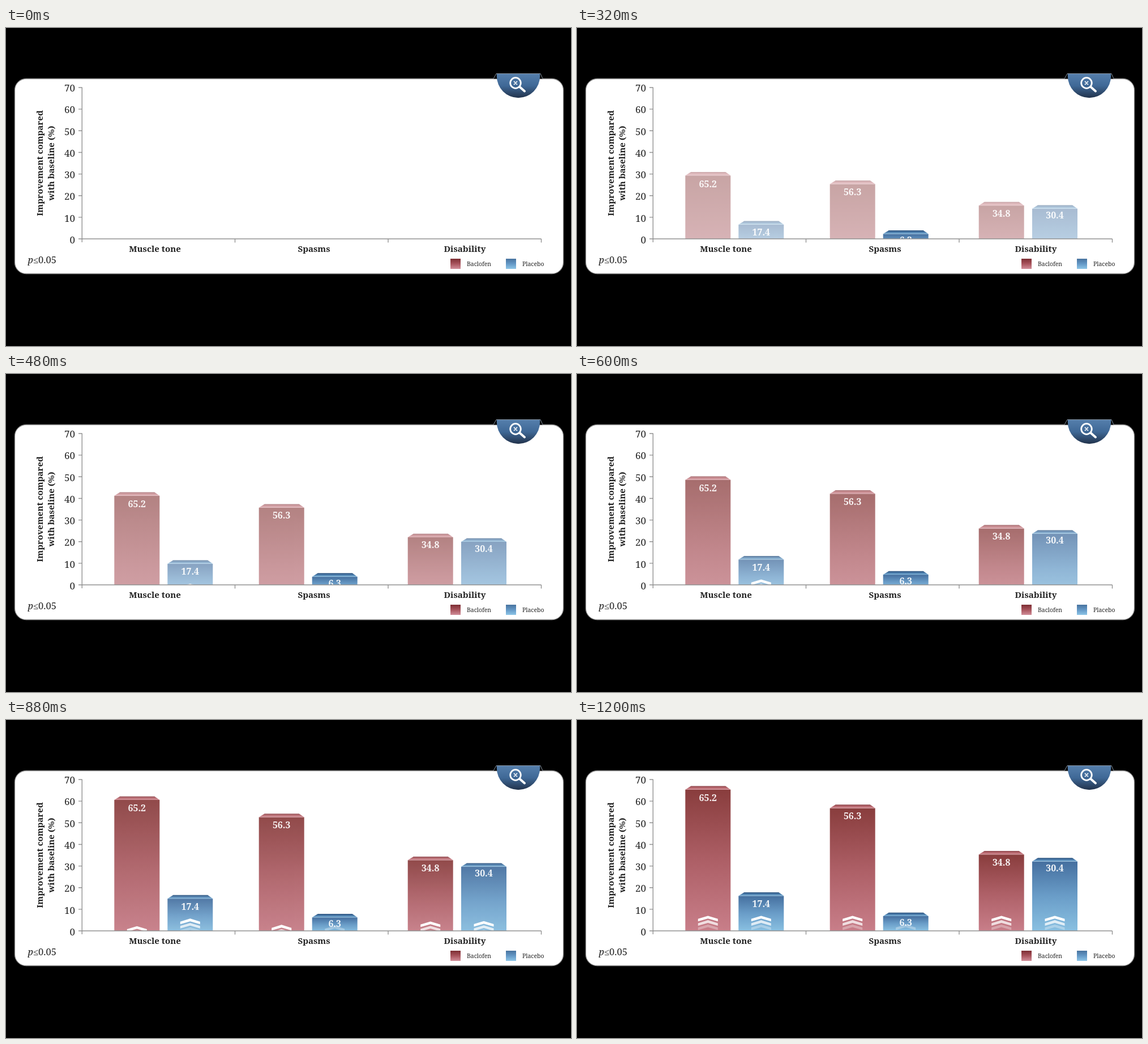
These frames come from a looping animation (998 px wide and 561 px high, 8000 ms). An HTML page:

```html
<!DOCTYPE html>
<html lang="en">
<head>
<meta charset="utf-8">
<title>Improvement compared with baseline</title>
<style>
  html, body { margin: 0; width: 100%; height: 100%; overflow: hidden; background: #000; }
  svg { display: block; font-family: "Noto Serif", serif; fill: #222; }
  .axis { stroke: #929292; stroke-width: 1.4; fill: none; }
  .tick { font-size: 17px; text-anchor: end; }
  .bold { font-size: 15.1px; font-weight: bold; text-anchor: middle; }
  .value { font-size: 16px; font-weight: bold; text-anchor: middle; fill: #fff; fill-opacity: .93; }
  .legend { font-size: 10.4px; }
  .icon { stroke: #fff; fill: none; stroke-linecap: round; }
</style>
</head>
<body>
<svg width="998" height="561" viewBox="0 0 998 561">
  <defs>
    <clipPath id="plot"><rect x="135" y="90" width="810" height="282"/></clipPath>
    <path id="chevron" d="M-17.5 5.3 L0 0 L17.5 5.3 V9.8 L0 4.8 L-17.5 9.8Z" fill="#fff"/>
  </defs>
  <rect x="15.5" y="89.5" width="969" height="344" rx="20" fill="#fff" stroke="#8a8a8a" stroke-width="1.3"/>

  <path d="M861 89.5 L866 80.5 H944 L948 89.5" fill="#000" stroke="#8793a0"/>
  <path d="M866.8 81 H943.2 V85 A38.2 38.2 0 0 1 866.8 85Z" fill="url(#tab)"/>
  <g class="icon">
    <circle cx="900" cy="97" r="9.3" stroke-width="2.8"/>
    <path d="M907.5 104 L916 111.5" stroke-width="4"/>
    <path d="M897.5 94.5 l5 5 m0 -5 l-5 5" stroke-width="1.7"/>
  </g>

  <g id="bars" clip-path="url(#plot)"></g>
  <g id="axes"></g>

  <text class="bold" transform="translate(65 238.5) rotate(-90)">Improvement compared</text>
  <text class="bold" transform="translate(85 238.5) rotate(-90)">with baseline (%)</text>
  <text class="bold" x="263" y="395">Muscle tone</text>
  <text class="bold" x="544" y="395">Spasms</text>
  <text class="bold" x="810.5" y="395">Disability</text>
  <text x="38.5" y="415" font-size="16.5"><tspan font-style="italic">p</tspan>≤0.05</text>
  <rect x="785" y="407" width="18" height="18" fill="url(#redKey)"/>
  <text class="legend" x="814" y="420">Baclofen</text>
  <rect x="883" y="407" width="18" height="18" fill="url(#blueKey)"/>
  <text class="legend" x="912" y="420">Placebo</text>
</svg>
<script>
const BASE = 372, RISE = 1200, LOOP = 8000, STEP = 40;
const byId = id => document.getElementById(id);

const gradients = {
  tab: ['#557fac', '#3f6896', '#22334c'],
  redKey: ['#7d2e33', '#a8545d', '#d18e99'],
  blueKey: ['#48739f', '#6498c6', '#8dc5e7'],
  red: ['#893d3d', '#ad5f66', '#c87e89'],
  blue: ['#456f9f', '#6a9dc8', '#89c0e1'],
  redTop: ['#8d444a', '#b9696f', '#d28e97'],
  blueTop: ['#2c527d', '#4a7cac', '#85b9dc'],
};
document.querySelector('defs').innerHTML += Object.entries(gradients).map(([id, colors]) =>
  `<linearGradient id="${id}" x2="0" y2="1">` +
  colors.map((c, i) => `<stop offset="${i / 2}" stop-color="${c}"/>`).join('') +
  '</linearGradient>').join('');

let axes = `<path class="axis" d="M134.3 104.5 V378 M134.3 ${BASE} H945.5`;
for (const x of [404.5, 675, 945.5]) axes += `M${x} ${BASE} v6.5`;
for (let i = 0; i < 8; i++) axes += `M128 ${BASE - i * 38.14} h6`;
axes += '"/>';
for (let i = 0; i < 8; i++) axes += `<text class="tick" x="122" y="${380 - i * 38.3}">${i * 10}</text>`;
byId('axes').innerHTML = axes;

// left edge, top edge, label centre, value, colour
const bars = [
  [191.3, 116.5, 137.5, '65.2', 'red'],
  [285.3, 304, 324, '17.4', 'blue'],
  [446.7, 149.3, 169.3, '56.3', 'red'],
  [540.7, 339.7, 357.3, '6.3', 'blue'],
  [709.7, 231, 251, '34.8', 'red'],
  [804, 243.3, 261.5, '30.4', 'blue'],
];
const isShort = bar => BASE - bar[1] < 40;

byId('bars').innerHTML = bars.map(bar => {
  const [x, top, labelY, value, color] = bar;
  const front = top + 6.3, mid = x + 40;
  const chevrons = [1, .75, .3].map((opacity, i) => isShort(bar) && i < 2 ? '' :
    `<use href="#chevron" x="${mid}" y="${345.5 + i * 7.6}" opacity="${opacity}"/>`).join('');
  return `<g>
    <rect x="${x}" y="${front}" width="80" height="${BASE - front}" fill="url(#${color})"/>
    <path d="M${x} ${front} l10 -6.3 h61 l9 6.3Z" fill="url(#${color}Top)"/>
    ${chevrons}
    <text class="value" x="${mid}" y="${labelY + 5.7}">${value}</text>
  </g>`;
}).join('');
const groups = [...byId('bars').children];

function draw(now) {
  const t = Math.floor(now % LOOP / STEP) * STEP;
  const progress = 1 - (1 - Math.min(t / RISE, 1)) ** 2;
  groups.forEach((group, i) => {
    const drop = (BASE - bars[i][1]) * (1 - progress);
    group.setAttribute('transform', `translate(0 ${drop})`);
    group.setAttribute('opacity', isShort(bars[i]) ? 1 : progress);
  });
}

const start = performance.now();
function frame() {
  draw(performance.now() - start);
  requestAnimationFrame(frame);
}
frame();
</script>
</body>
</html>
```
